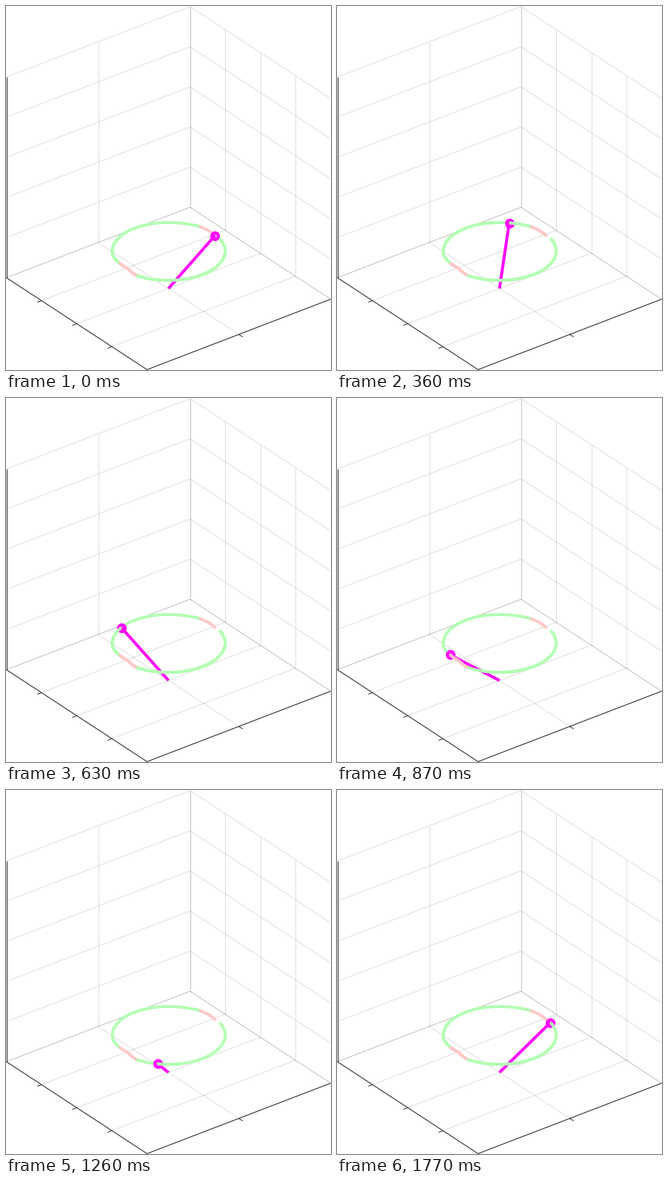
Recreate the animation shown at these times as a matplotlib script. Size 439 px wide and 491 px high, loop 1.8 s.

```python
import numpy as np
import matplotlib.pyplot as plt
from matplotlib.animation import FuncAnimation
from matplotlib.collections import LineCollection

W, H, DPI = 439, 491, 64  # a power of two keeps the pixel size exact
FRAMES, INTERVAL = 60, 30
PX = 72 / DPI
GREEN, PINK, MAGENTA, INK = "#b3ffb3", "#ffc8c8", "#ff00ff", "#262626"

fig = plt.figure(figsize=(W / DPI, H / DPI), dpi=DPI, facecolor="white")
ax = fig.add_axes([0, 0, 1, 1])
ax.set_xlim(0, W)
ax.set_ylim(H, 0)
ax.axis("off")

# Projected cube: left floor corner and the three edge vectors
LEFT = np.array([0.5, 366.5])
U = np.array([248.0, -95.0])
V = np.array([190.0, 124.0])
Z = np.array([0.0, -270.7])


def corner(s, t, h=0):
    return LEFT + s * U + t * V + h * Z


def line(p, q, **style):
    ax.plot(*zip(p, q), solid_capstyle="butt", **style)


def draw_box():
    grid = dict(color=INK, alpha=0.15, lw=PX, zorder=1)
    for h in np.linspace(0, 1, 6):
        line(corner(0, 0, h), corner(1, 0, h), **grid)
        line(corner(1, 0, h), corner(1, 1, h), **grid)
    for s in (0, 0.5, 1):
        line(corner(s, 0), corner(s, 0, 1), **grid)
        line(corner(s, 0), corner(s, 1), **grid)
    for t in np.linspace(0, 1, 5):
        line(corner(1, t), corner(1, t, 1), **grid)
        line(corner(0, t), corner(1, t), **grid)

    axis = dict(color=INK, lw=PX, zorder=2)
    line(corner(0, 0), corner(0, 0, 1), **axis)
    line(corner(0, 0), corner(0, 1), **axis)
    line(corner(0, 1), corner(1, 1), **axis)
    for t in (0.25, 0.5, 0.75):
        line(corner(0, t), corner(-0.023, t), **axis)
    line(corner(0.5, 1), corner(0.5, 1.027), **axis)


def orbit():
    """Tip positions: slow along the pink arcs, fast along the green ones."""
    angle = np.interp(np.arange(FRAMES),
                      [0, 9, 18, 21, 29, 39, 42, 53, 59],
                      [34, 58, 125.5, 146.8, 204.2, 235.5, 258.4, 342.7, 386.6])
    radius = np.interp(angle,
                       [34, 47, 58, 75, 146, 190, 204, 219, 236, 258, 342, 386],
                       [.985, 1.005, 1.015, 1, 1.005, .997, .967, .935, 1.012, 1.006, .993, 1])
    a = np.radians(angle)
    return np.column_stack([220 + 76.5 * radius * np.cos(a),
                            331 - 39 * radius * np.sin(a)])


draw_box()
path = orbit()
pivot = corner(0.5, 0.5)

for lo, hi, color, cap in ((0, 9, PINK, "round"), (29, 39, PINK, "round"),
                           (9, 29, GREEN, "butt"), (39, 59, GREEN, "butt")):
    ax.plot(*path[lo:hi + 1].T, color=color, lw=4 * PX, zorder=3,
            solid_capstyle=cap, solid_joinstyle="round")

segments = np.stack([path[:-1], path[1:]], axis=1)
depth = segments[:, :, 1].mean(axis=1)
index = np.arange(FRAMES - 1)
shades = np.where((index < 9) | ((index >= 29) & (index < 39)), PINK, GREEN)

rod, = ax.plot([], [], color=MAGENTA, lw=4 * PX, zorder=4, solid_capstyle="butt")
tip, = ax.plot([], [], "o", ms=8.7 * PX, mfc="none", mec=MAGENTA,
               mew=4.4 * PX, zorder=5)
front = LineCollection([], linewidths=4 * PX, capstyle="butt", zorder=6)
ax.add_collection(front, autolim=False)


def update(i):
    x, y = path[i]
    rod.set_data([pivot[0], x], [pivot[1], y])
    tip.set_data([x], [y])
    # Ring pieces nearer to the viewer than the tip cover it
    near = depth > y
    front.set_segments(list(segments[near]))
    front.set_color(list(shades[near]))
    return rod, tip, front


anim = FuncAnimation(fig, update, frames=FRAMES, interval=INTERVAL,
                     repeat=True, repeat_delay=0)
plt.show()
```
